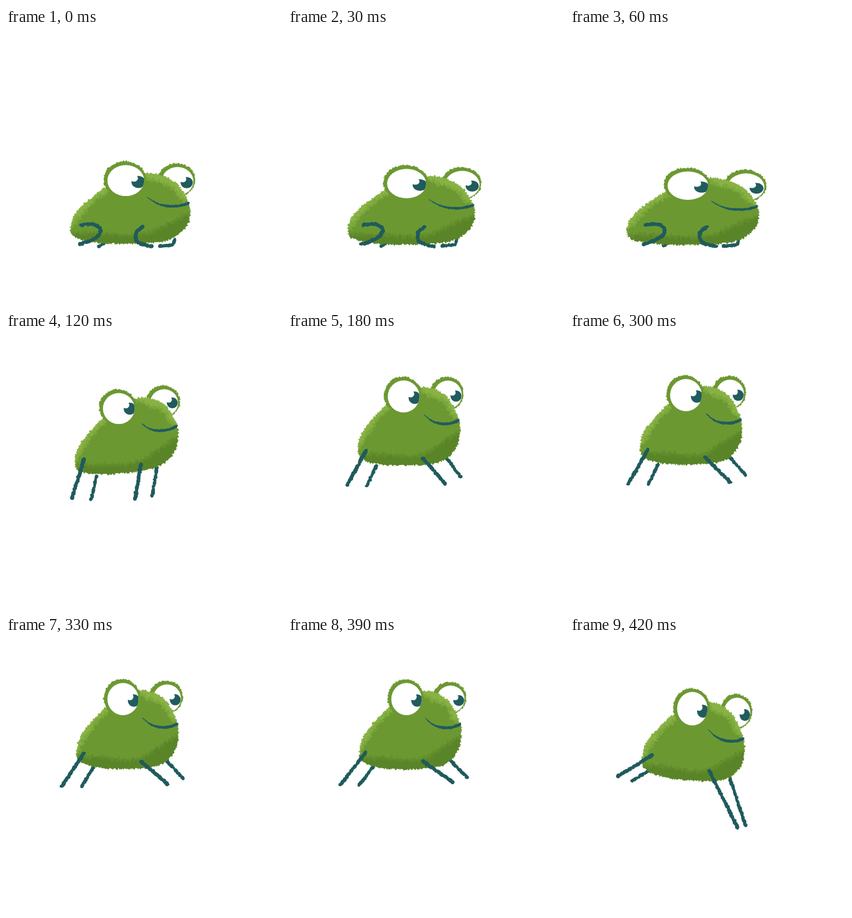
Animation, 432 px wide and 432 px high, one loop 0.48 s. Source, as an HTML page with a canvas:

```html
<!DOCTYPE html>
<html lang="en">
<head>
<meta charset="utf-8">
<title>Hopping frog</title>
<style>
  html, body { margin: 0; width: 100%; height: 100%; overflow: hidden; background: #fff; }
  canvas { display: block; width: 100vw; height: 100vh; }
</style>
</head>
<body>
<canvas id="stage" width="432" height="432"></canvas>
<script>
const ctx = document.getElementById('stage').getContext('2d');
const GREEN = '#6c9832', LIGHT = '#93bd4b', DARK = '#537d25', TEAL = '#205b5d';

// Shapes in body space: 0..1 across the body box.
const BODY = [0,.81, .05,.56, .26,.245, .46,.07, .66,0, .86,.12, .97,.37, .995,.57, .955,.78, .83,.94, .62,.995, .28,.995, .06,.93];
const BELLY = [-.05,.88, .2,.85, .5,.88, .66,.84, .8,.72, 1.05,.58, 1.05,1.1, .5,1.1, -.05,1.1];
const BACK = [-.06,.85, -.06,.3, .3,.05, .36,.2, .2,.4, .08,.63];
const BROW = [.5,-.06, .75,-.1, 1.02,.2, 1,.39, .92,.37, .84,.2, .68,.1];
const MOUTH = [.635,.34, .72,.42, .8,.45, .9,.45, .985,.41, .98,.45, .9,.485, .8,.485, .71,.435];

// Poses. body: x, y, width, height, shear; eyes: cx, cy, rx, ry; legs: point lists.
const crouch = {
  backNear: [118,308, 136,307, 148,315, 141,328, 114,339],
  backFar: [153,336, 145,342],
  frontNear: [214,311, 204,320, 206,335, 229,342],
  frontFar: [240,341, 260,339, 264,331]
};
const land = { body: [101,227,188,110,0], near: [186,237,33,28], far: [267,238,29,26], legs: crouch };
const squash = { body: [89,235,207,104,0], near: [183,245,36,26], far: [274,247,33,25], legs: crouch };
const leap = {
  body: [108,105,162,115,-.09], near: [175,118,29,28], far: [246,109,26,25],
  legs: { backNear: [122,199, 103,261], backFar: [142,225, 133,263], frontNear: [211,207, 202,262], frontFar: [236,212, 229,257] }
};
const hover = {
  body: [110,85,160,122,0], near: [180,97,29,29], far: [249,95,26,26],
  legs: { backNear: [122,184, 91,238], backFar: [138,207, 122,239], frontNear: [211,196, 251,235], frontFar: [250,196, 276,225] }
};
const reach = {
  body: [112,86,160,122,0], near: [184,97,28,29], far: [253,97,26,25],
  legs: { backNear: [121,183, 81,234], backFar: [134,204, 111,234], frontNear: [211,196, 258,229], frontFar: [254,195, 281,222] }
};
const fall = {
  body: [113,101,161,125,.08], near: [190,112,28,30], far: [260,118,25,27],
  legs: { backNear: [128,187, 74,220], backFar: [122,211, 96,228], frontNear: [218,211, 263,301], frontFar: [250,222, 275,297] }
};

function mix(a, b, k) {
  if (typeof a === 'number') return a + (b - a) * k;
  if (Array.isArray(a)) return a.map((v, i) => mix(v, b[i], k));
  return Object.fromEntries(Object.keys(a).map(key => [key, mix(a[key], b[key], k)]));
}

const timeline = [
  [0, land], [30, mix(land, squash, .6)], [60, squash],
  [120, leap], [150, mix(leap, hover, .6)], [180, mix(leap, hover, .9)],
  [210, hover], [300, hover], [330, mix(hover, reach, .4)], [360, mix(hover, reach, .8)],
  [390, reach], [420, fall]
];

let seed = 1;
function rand() {
  seed = (seed * 16807) % 2147483647;
  return seed / 2147483647;
}

const pairs = flat => Array.from({ length: flat.length / 2 }, (_, i) => [flat[2 * i], flat[2 * i + 1]]);

// Catmull-Rom spline sampled about every 1.2 px.
function curve(pts, closed) {
  const n = pts.length, out = [];
  const at = i => closed ? pts[(i + n) % n] : pts[Math.max(0, Math.min(n - 1, i))];
  for (let i = 0; i < (closed ? n : n - 1); i++) {
    const [a, b, c, d] = [at(i - 1), at(i), at(i + 1), at(i + 2)];
    const steps = Math.max(2, Math.round(Math.hypot(c[0] - b[0], c[1] - b[1]) / 1.2));
    for (let s = 0; s < steps; s++) {
      const t = s / steps;
      out.push([0, 1].map(k => b[k] + t / 2 * (c[k] - a[k]
        + t * (2 * a[k] - 5 * b[k] + 4 * c[k] - d[k] + t * (3 * (b[k] - c[k]) + d[k] - a[k])))));
    }
  }
  return out;
}

// Closed path with each point pushed along its normal by a random amount.
function furry(pts, low, high) {
  const path = new Path2D(), n = pts.length;
  pts.forEach(([x, y], i) => {
    const p = pts[(i + n - 1) % n], q = pts[(i + 1) % n];
    const dx = q[0] - p[0], dy = q[1] - p[1], len = Math.hypot(dx, dy) || 1;
    const push = low + (high - low) * rand() ** 1.5;
    path.lineTo(x + dy / len * push, y - dx / len * push);
  });
  path.closePath();
  return path;
}

function fill(path, color, alpha = 1) {
  ctx.globalAlpha = alpha;
  ctx.fillStyle = color;
  ctx.fill(path);
  ctx.globalAlpha = 1;
}

function oval(x, y, rx, ry) {
  const path = new Path2D();
  path.ellipse(x, y, rx, ry, 0, 0, 2 * Math.PI);
  return path;
}

function drawEye([x, y, rx, ry], look, shear) {
  const rim = Array.from({ length: 140 }, (_, i) => {
    const a = i * Math.PI / 70;
    return [x + rx * Math.cos(a), y + ry * Math.sin(a)];
  });
  fill(furry(rim, -.6, 1.8), GREEN);
  const white = oval(x + 1.5, y + 1.8, rx - 4.2, ry - 3.8);
  fill(white, '#fff');
  ctx.save();
  ctx.clip(white);
  const px = x + rx * look + .5, py = y + 4 + 22 * shear, pw = rx * .33, ph = ry * .34;
  fill(oval(px, py, pw, ph), TEAL);
  fill(oval(px - pw * .65, py - ph * .6, pw * .58, ph * .55), '#fff');
  ctx.restore();
}

function drawLeg(flat, radius) {
  const size = () => radius * (.6 + rand() * .5);
  for (const [x, y] of curve(pairs(flat), false)) {
    fill(oval(x + rand() * 1.6 - .8, y + rand() * 1.6 - .8, size(), size()), TEAL);
  }
}

function drawBody([x, y, w, h, shear]) {
  const place = flat => curve(pairs(flat).map(([u, v]) => [x + u * w, y + v * h + shear * (u - .5) * w]), true);
  const body = furry(place(BODY), -1, 2.2);
  fill(body, GREEN);
  ctx.save();
  ctx.clip(body);
  for (const [shape, color] of [[BACK, LIGHT], [BROW, LIGHT], [BELLY, DARK]]) {
    fill(furry(place(shape), -1, 5), color, .4);
    fill(furry(place(shape), -6, 1), color, .5);
  }
  ctx.restore();
  return () => fill(furry(place(MOUTH), -.3, .6), TEAL);
}

function draw(pose) {
  const { body, near, far, legs } = pose, shear = body[4];
  ctx.fillStyle = '#fff';
  ctx.fillRect(0, 0, 432, 432);
  drawLeg(legs.backFar, 2.8);
  drawLeg(legs.frontFar, 2.8);
  drawEye(far, .53, shear);
  const drawMouth = drawBody(body);
  drawEye(near, .63, shear);
  drawMouth();
  drawLeg(legs.backNear, 3);
  drawLeg(legs.frontNear, 3);
}

let shown = -1;
function tick() {
  const time = performance.now() % 480;
  const step = timeline.findLastIndex(([start]) => start <= time);
  if (step !== shown) {
    shown = step;
    seed = 7919 * (step + 1);
    draw(timeline[step][1]);
  }
  requestAnimationFrame(tick);
}
tick();
</script>
</body>
</html>
```
